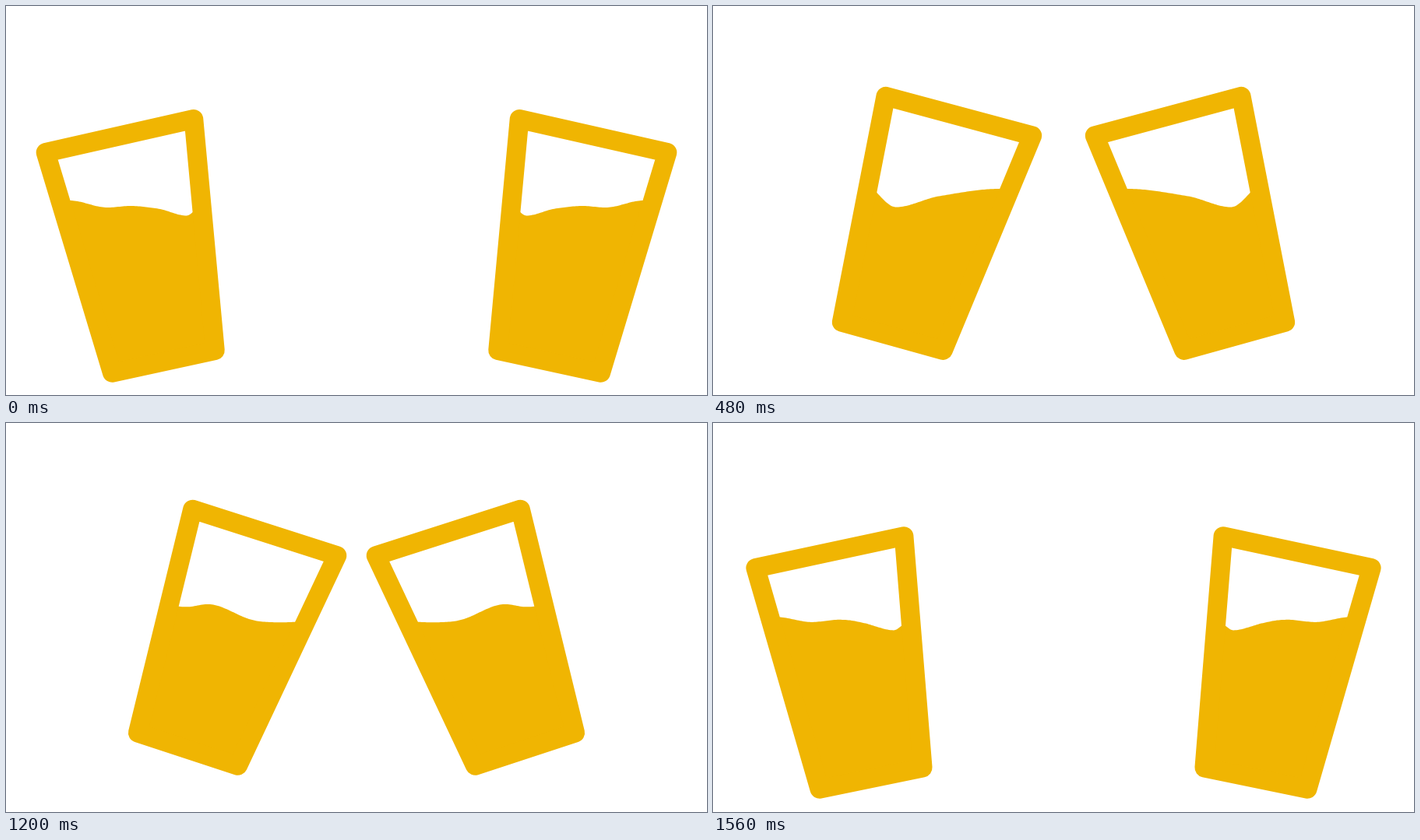
An HTML page with a canvas that plays this animation: 900x500 px, repeating every 1.6 s.

```html
<!DOCTYPE html>
<html lang="en">
<head>
<meta charset="utf-8">
<title>Cheers</title>
<style>
  html, body { margin: 0; width: 100%; height: 100%; overflow: hidden; background: #fff; }
  canvas { display: block; }
</style>
</head>
<body>
<canvas id="stage" width="900" height="500"></canvas>
<script>
const ctx = document.getElementById('stage').getContext('2d');
const WIDTH = 900, HEIGHT = 500, LOOP = 1600, STEP = 40;
const CLINK = 640, PART = 1120;
const COLOR = '#f0b502';

// Glass corners around its pivot
const GLASS = [[-104.1, -138.4], [90.6, -138.4], [51.8, 157.6], [-83.4, 156.5]];
const APART = { x: 183.1, y: 300.4, angle: -12.75 };
const TOGETHER = { x: 305.5, y: 272.5, angle: 20.2 };

// Ends of the rays above and below the point of contact
const RAYS = [
  [372, 63, 405, 105], [430, 59, 440, 96.5], [480, 46, 472, 93], [527, 77, 500, 109],
  [425, 269, 408.5, 315.5], [448, 273, 450, 341], [472, 266, 490.5, 311.5]
];

// The beer sloshes between these surfaces, given by their crests, troughs and bends
const SLOSH = [
  { time: 0, points: [[82, 250], [130, 259], [160, 257], [195, 260.5], [232, 269.5], [248, 260]] },
  { time: 320, points: [[120, 234], [162, 242], [233, 273], [272, 257], [313, 249.5]] },
  { time: 480, points: [[190, 226], [235, 258.5], [290, 244.5], [368, 235]] },
  { time: 640, points: [[212, 242], [239, 252.5], [300, 235.5], [365, 216], [405, 202]] },
  { time: 960, points: [[240, 213], [312, 243], [352, 250], [387, 246.5]] },
  { time: 1320, points: [[90, 246], [172, 227], [208, 245], [233, 248], [265, 240], [328, 259.5]] }
];
SLOSH.push({ time: LOOP, points: SLOSH[0].points });

const lerp = (a, b, k) => a + (b - a) * k;
const clamp = k => Math.min(1, Math.max(0, k));
const smooth = k => k * k * (3 - 2 * k);

// Level at crests, troughs and ends, otherwise the harmonic mean of both sides
function slopeAt(points, i) {
  if (i === 0 || i === points.length - 1) return 0;
  const [[x0, y0], [x1, y1], [x2, y2]] = points.slice(i - 1, i + 2);
  const a = (y1 - y0) / (x1 - x0), b = (y2 - y1) / (x2 - x1);
  return a * b > 0 ? 2 * a * b / (a + b) : 0;
}

function heightAt(points, x) {
  const next = points.findIndex(p => p[0] > x);
  if (next === 0) return points[0][1];
  if (next < 0) return points[points.length - 1][1];
  const [x0, y0] = points[next - 1], [x1, y1] = points[next];
  const w = x1 - x0, k = (x - x0) / w;
  return lerp(y0, y1, smooth(k))
    + w * k * (1 - k) * ((1 - k) * slopeAt(points, next - 1) - k * slopeAt(points, next));
}

function poseAt(t) {
  const k = t < PART ? smooth(clamp(t / CLINK)) : 1 - smooth((t - PART) / (LOOP - PART));
  return {
    x: lerp(APART.x, TOGETHER.x, k),
    y: lerp(APART.y, TOGETHER.y, k),
    angle: lerp(APART.angle, TOGETHER.angle, k) * Math.PI / 180
  };
}

function glassOutline(t) {
  const { x, y, angle } = poseAt(t);
  const cos = Math.cos(angle), sin = Math.sin(angle);
  const outline = new Path2D();
  for (const [u, v] of GLASS) outline.lineTo(x + u * cos - v * sin, y + u * sin + v * cos);
  outline.closePath();
  return outline;
}

function fillBeer(t) {
  const next = SLOSH.findIndex(s => s.time > t);
  const from = SLOSH[next - 1], to = SLOSH[next];
  const k = (t - from.time) / (to.time - from.time);
  ctx.beginPath();
  ctx.moveTo(0, HEIGHT);
  for (let x = 0; x <= WIDTH / 2; x += 2) {
    ctx.lineTo(x, lerp(heightAt(from.points, x), heightAt(to.points, x), k));
  }
  ctx.lineTo(WIDTH / 2, HEIGHT);
  ctx.fill();
}

function drawGlass(t) {
  const outline = glassOutline(t);
  ctx.save();
  ctx.clip(outline);
  fillBeer(t);
  ctx.restore();
  ctx.lineWidth = 24.7;
  ctx.stroke(outline);
}

function drawRays() {
  ctx.lineWidth = 11;
  ctx.beginPath();
  for (const [x1, y1, x2, y2] of RAYS) {
    ctx.moveTo(x1, y1);
    ctx.lineTo(x2, y2);
  }
  ctx.stroke();
}

function draw(t) {
  ctx.fillStyle = '#fff';
  ctx.fillRect(0, 0, WIDTH, HEIGHT);
  ctx.fillStyle = ctx.strokeStyle = COLOR;
  ctx.lineCap = ctx.lineJoin = 'round';
  drawGlass(t);
  ctx.save();
  ctx.translate(WIDTH, 0);
  ctx.scale(-1, 1);
  drawGlass(t);
  ctx.restore();
  if (t >= CLINK && t < PART) drawRays();
}

let start;
function tick(now) {
  start ??= now;
  draw(Math.floor(((now - start) % LOOP) / STEP) * STEP);
  requestAnimationFrame(tick);
}
draw(0);
requestAnimationFrame(tick);
</script>
</body>
</html>
```
